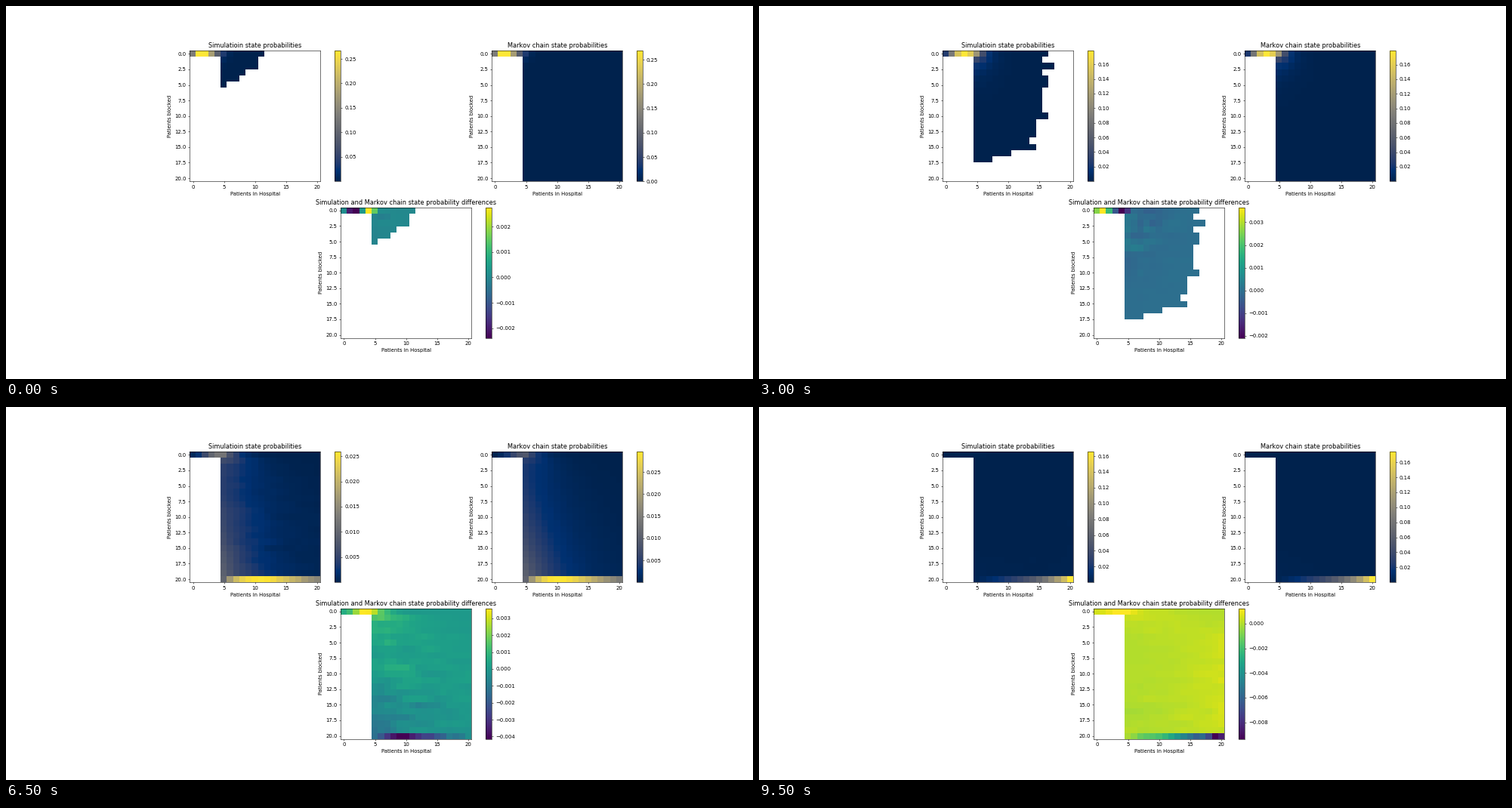
A matplotlib script that plays this animation: 989 by 494 pixels, repeating every 10000 ms.

```python
import random

import numpy as np
import matplotlib.pyplot as plt
from matplotlib.animation import FuncAnimation

WIDTH, HEIGHT, DPI = 989, 494, 49.45
FRAMES, INTERVAL = 20, 500
SERVERS, THRESHOLD, CAP = 5, 5, 20
BLOCK_RATE, SERVICE_RATE = 1.0, 1.0
ARRIVALS = np.linspace(1, 6, FRAMES)
TRIALS, TRIAL_TIME = 60, 350


def markov_probabilities(rate):
    states = [(0, v) for v in range(THRESHOLD)]
    states += [(u, v) for u in range(CAP + 1) for v in range(THRESHOLD, CAP + 1)]
    index = {state: k for k, state in enumerate(states)}
    q = np.zeros((len(states), len(states)))

    def flow(start, end, amount):
        if end in index:
            q[index[start], index[end]] += amount
            q[index[start], index[start]] -= amount

    for u, v in states:
        flow((u, v), (u, v + 1), rate)
        flow((u, v), (u, v + 1) if v < THRESHOLD else (u + 1, v), BLOCK_RATE)
        release = v == THRESHOLD and u > 0
        flow((u, v), (u - 1, v) if release else (u, v - 1),
             min(v, SERVERS) * SERVICE_RATE)

    balance = q.T.copy()
    balance[0] = 1
    total = np.zeros(len(states))
    total[0] = 1
    grid = np.full((CAP + 1, CAP + 1), np.nan)
    for state, p in zip(states, np.linalg.solve(balance, total)):
        grid[state] = p
    return grid


def simulated_probabilities(rate, seed):
    """Share of time per state over trials that each start empty."""
    rand = random.Random(seed).random
    arrivals = rate + BLOCK_RATE
    totals = [arrivals + min(v, SERVERS) * SERVICE_RATE for v in range(CAP + 1)]
    dwell = [1 / total for total in totals]
    visits = [[0] * (CAP + 1) for _ in range(CAP + 1)]

    for _ in range(TRIALS):
        u = v = clock = 0
        while clock < TRIAL_TIME:
            visits[u][v] += 1
            clock += dwell[v]
            event = rand() * totals[v]
            if event < rate:
                if v < CAP:
                    v += 1
            elif event < arrivals:
                if v < THRESHOLD:
                    v += 1
                elif u < CAP:
                    u += 1
            elif v == THRESHOLD and u:
                u -= 1
            else:
                v -= 1

    times = np.array(visits) * np.array(dwell)
    return np.where(times > 0, times / times.sum(), np.nan)


def heatmap(position, grid, title, cmap):
    ax = plt.subplot2grid((2, 4), position, colspan=2, fig=fig)
    image = ax.imshow(grid, cmap=cmap)
    ax.set_title(title)
    ax.set_xlabel("Patients in Hospital")
    ax.set_ylabel("Patients blocked")
    fig.colorbar(image, ax=ax)


def draw(i):
    fig.clear()
    fig.subplots_adjust(left=0.1244, right=0.8994)
    markov, simulated = results[i]
    heatmap((0, 0), simulated, "Simulatioin state probabilities", "cividis")
    heatmap((0, 2), markov, "Markov chain state probabilities", "cividis")
    heatmap((1, 1), simulated - markov,
            "Simulation and Markov chain state probability differences", "viridis")
    return []


results = [(markov_probabilities(rate), simulated_probabilities(rate, seed))
           for seed, rate in enumerate(ARRIVALS)]

# The tiny margin keeps float rounding from losing a pixel.
fig = plt.figure(figsize=((WIDTH + 1e-3) / DPI, (HEIGHT + 1e-3) / DPI), dpi=DPI)
animation = FuncAnimation(fig, draw, frames=FRAMES, interval=INTERVAL,
                          init_func=lambda: [], repeat=True, repeat_delay=0)
plt.show()
```
